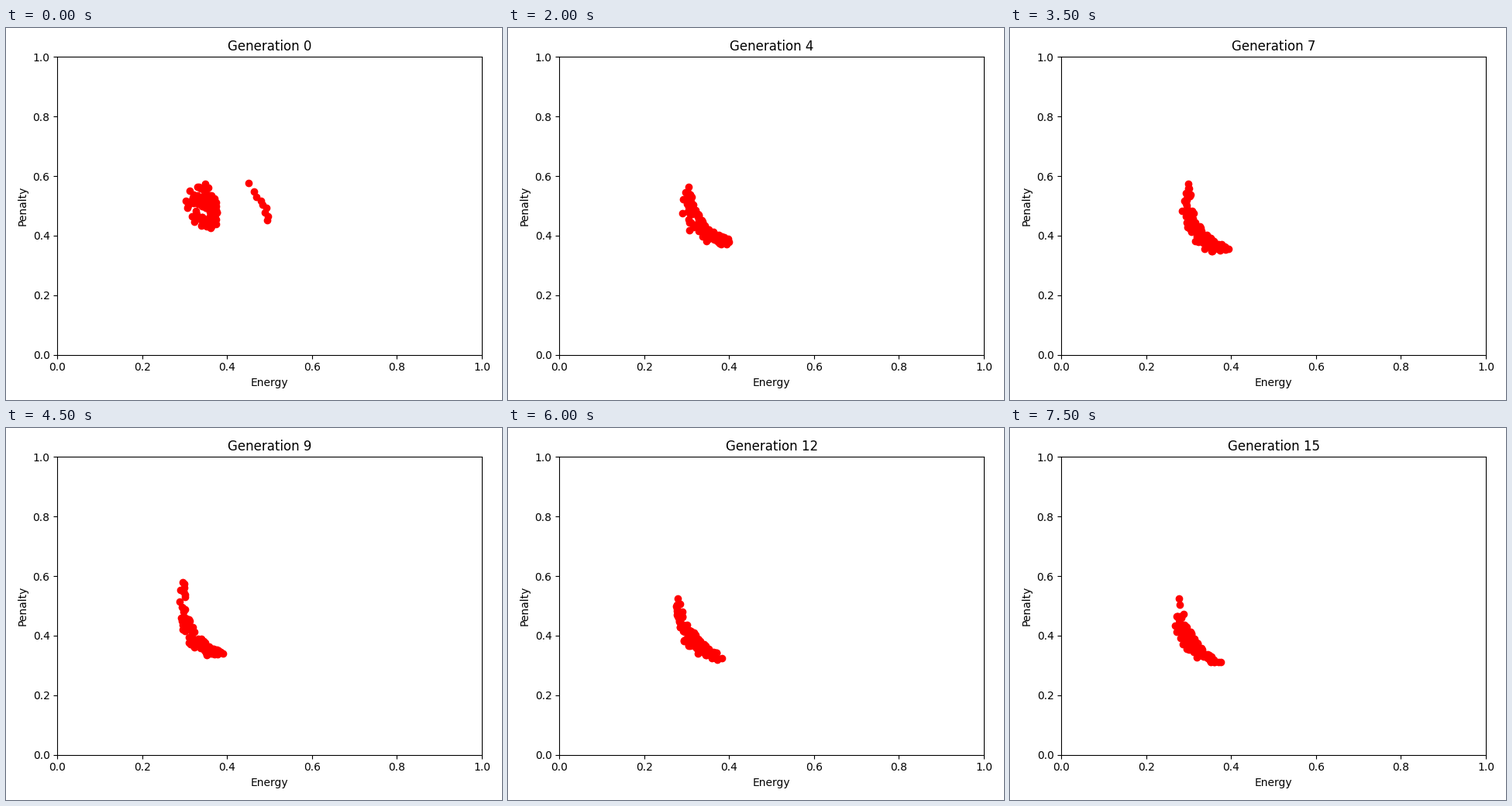
Animation of 640 by 480 pixels, one loop 8 s. Source, as a matplotlib script:

```python
import numpy as np
import matplotlib.pyplot as plt
from matplotlib.animation import FuncAnimation

GENERATIONS = 16
DOTS = 96
LIFE = 4  # generations before a dot is replaced

# Key generations of the front: curve start, control and end in stage
# pixels, then the half width of the crowd around it
KEYS = [0, 2, 5, 10, 12, 15]
FRONT = np.array([
    [257, 202, 254, 226, 264, 258, 16],
    [237, 210, 243, 256, 285, 270, 8],
    [231, 203, 223, 270, 285, 280, 7.5],
    [227, 199, 223, 285, 278, 294, 6],
    [219, 220, 222, 277, 276, 297, 6.5],
    [218, 220, 217, 283, 272, 302, 6.5],
])

rng = np.random.default_rng(7)
shape = (DOTS, GENERATIONS // LIFE + 1)
along = rng.beta(1.6, 1.4, shape)
across = rng.uniform(-1, 1, shape)
# A few strays run ahead of the front
strays = rng.random(shape) < 0.08
across[strays] = rng.uniform(1, 1.8, strays.sum())
# The two extremes always survive
along[:2] = [[0], [1]]
across[:2] = 0


def bezier(a, b, c, t):
    """Points and unit normals of a quadratic curve."""
    t = t[:, None]
    pts = (1 - t) ** 2 * a + 2 * t * (1 - t) * b + t ** 2 * c
    tangent = (1 - t) * (b - a) + t * (c - b)
    normal = np.column_stack([-tangent[:, 1], tangent[:, 0]])
    return pts, normal / np.linalg.norm(normal, axis=1, keepdims=True)


def crowd(gen):
    *xy, width = [np.interp(gen, KEYS, col) for col in FRONT.T]
    index = np.arange(DOTS)
    life = (gen + index % LIFE) // LIFE
    t, u = along[index, life], across[index, life]
    pts, normal = bezier(*np.reshape(xy, (3, 2)), t)
    spread = u * width * (0.5 + 0.5 * np.sin(np.pi * t))
    return pts + normal * spread[:, None]


def outsiders():
    """The separate group that only the first generation has."""
    a, b, c = np.array([(314, 199), (336, 220), (339, 248)])
    pts, normal = bezier(a, b, c, np.linspace(0, 1, 9) ** 0.7)
    return pts + normal * rng.uniform(-1, 6, (9, 1))


first_group = outsiders()

fig, ax = plt.subplots(figsize=(6.4, 4.8), dpi=100)
ax.set(xlim=(0, 1), ylim=(0, 1), xlabel="Energy", ylabel="Penalty")
title = ax.set_title("Generation 0")
dots, = ax.plot([], [], "ro")
fig.tight_layout()


def update(gen):
    px = crowd(gen)
    if gen == 0:
        px = np.vstack([px, first_group])
    dots.set_data((px[:, 0] - 66) / 548, (422 - px[:, 1]) / 384)
    title.set_text(f"Generation {gen}")
    return dots, title


anim = FuncAnimation(fig, update, frames=GENERATIONS, interval=500,
                     repeat=True, repeat_delay=0, blit=False)
plt.show()
```
